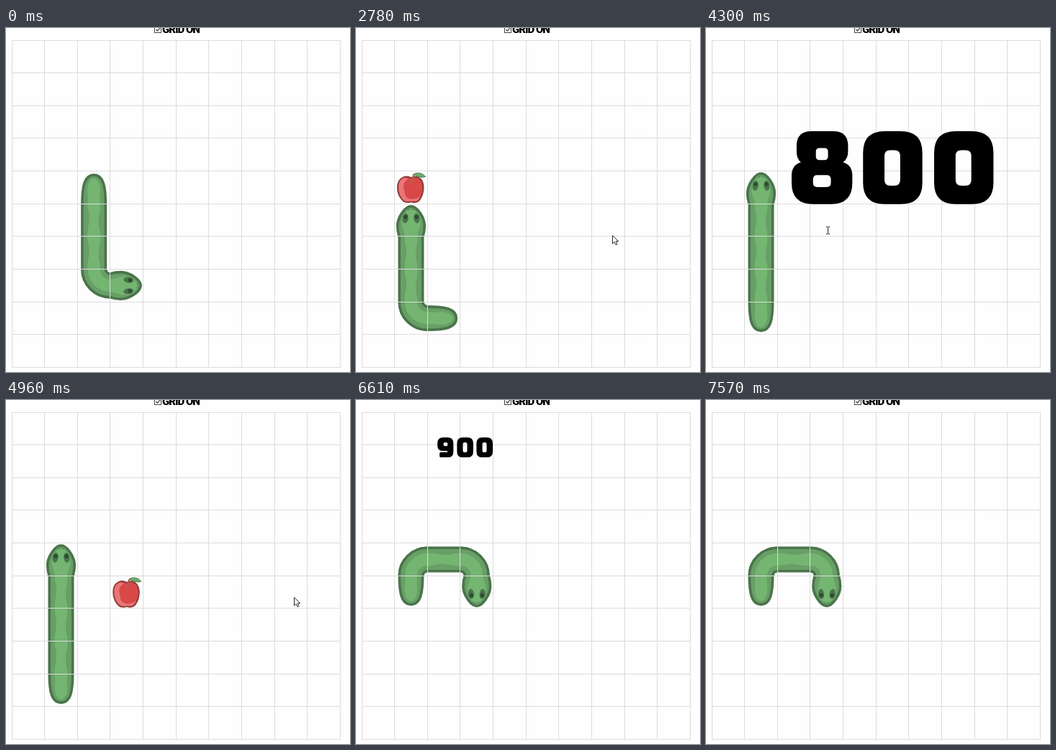
An HTML page that plays this animation: 478x480 px, repeating every 7650 ms.

```html
<!DOCTYPE html>
<html lang="en">
<head>
<meta charset="utf-8">
<title>Snake</title>
<style>
  html, body { margin: 0; width: 100%; height: 100%; overflow: hidden; background: #fefefe; }
  svg { display: block; }
  .dark { fill: #4a744b; }
  .mid { fill: #689f66; }
  .light { fill: #73b571; }
  .edge { fill: #689f66; stroke: #4a744b; stroke-width: 3.6; }
  .arc { fill: none; }
  #label { font: 900 15px Roboto, sans-serif; letter-spacing: -1px; }
</style>
</head>
<body>
<svg width="478" height="480" viewBox="0 0 478 480">
  <defs>
    <!-- Tiles are centred on 0,0 and face up. -->
    <g id="head">
      <path class="edge" d="M-16.5 23C-18.4 17 -18.8 13 -18.8 8C-18.8 -4 -8 -19.4 0 -19.4S18.8 -4 18.8 8C18.8 13 18.4 17 16.5 23"/>
      <path class="light" d="M-9 23C-9 15 -13 11 -13 4C-13 -6 -6 -15 0 -15S13 -6 13 4C13 11 9 15 9 23Z"/>
      <g class="dark">
        <ellipse cx="-7.8" cy="-2.5" rx="4" ry="7" transform="rotate(8 -7.8 -2.5)"/>
        <ellipse cx="7.8" cy="-2.5" rx="4" ry="7" transform="rotate(-8 7.8 -2.5)"/>
        <circle cx="-2.5" cy="-15" r=".9"/><circle cx="2.5" cy="-15" r=".9"/>
      </g>
      <g fill="#2f4b31"><circle cx="-7.6" cy="-4.5" r="2.8"/><circle cx="7.6" cy="-4.5" r="2.8"/></g>
    </g>
    <g id="straight">
      <path class="dark" d="M-18 -23H18V23H-18Z"/>
      <path class="mid" d="M-14.5 -23H14.5V23H-14.5Z"/>
      <path class="light" d="M-9 -23C-9 -13 -5.5 -9 -6.5 0S-9 13 -9 23H9C9 13 5.5 9 6.5 0S9 -13 9 -23Z"/>
    </g>
    <g id="turn" class="arc">
      <path id="bend" d="M0 -22.8A22.8 22.8 0 0 0 22.8 0" stroke="#4a744b" stroke-width="36"/>
      <use href="#bend"/>
      <path d="M0 -22.8A22.8 22.8 0 0 0 22.8 0" stroke="#689f66" stroke-width="29"/>
      <path d="M0 -22.8A22.8 22.8 0 0 0 22.8 0" stroke="#73b571" stroke-width="17"/>
    </g>
    <g id="tail">
      <path class="edge" d="M-16.2 -23C-16.2 2 -13 17.3 0 17.3S16.2 2 16.2 -23"/>
      <path class="light" d="M-9 -23C-7 -14 -9.5 -6 -8.5 0C-7.5 8 -4 12.5 0 12.5S7.5 8 8.5 0C9.5 -6 7 -14 9 -23Z"/>
    </g>
    <g id="eight">
      <path fill-rule="evenodd" d="M36 127.5H66Q87 127.5 87 148V156Q87 166 80 171Q93 175 93 190V200Q93 230 63 230H38Q8 230 8 200V190Q8 175 21 171Q15 166 15 156V148Q15 127.5 36 127.5Z
        M47 151Q42 151 42 156V163Q42 168 47 168H54Q59 168 59 163V156Q59 151 54 151Z
        M44 189Q38 189 38 195V200Q38 206 44 206H57Q63 206 63 200V195Q63 189 57 189Z"/>
    </g>
    <g id="nine">
      <path fill-rule="evenodd" d="M38 127.5H60Q89.5 127.5 89.5 158V200Q89.5 230 62 230H26Q19 230 19 224V209Q19 203 25 203H59V197H36Q8 197 8 168V158Q8 127.5 38 127.5Z
        M45 154Q39 154 39 160V166Q39 172 45 172H54Q60 172 60 166V160Q60 154 54 154Z"/>
    </g>
    <g id="zero">
      <path fill-rule="evenodd" d="M138 127.5H161Q191 127.5 191 158V200Q191 230 161 230H138Q108 230 108 200V158Q108 127.5 138 127.5Z
        M146 154Q138 154 138 162V196Q138 204 146 204H152Q160 204 160 196V162Q160 154 152 154Z"/>
    </g>
  </defs>

  <rect x="206.5" y="-2.5" width="9" height="9" fill="#fff" stroke="#444"/>
  <path d="M208.5 2l2 2.2 4-5" fill="none" stroke="#333" stroke-width="1.2"/>
  <text id="label" x="217" y="7">GRID ON</text>

  <g id="snake"></g>
  <g id="apple">
    <path fill="#d84848" stroke="#8d3a3a" stroke-width="2" d="M0 -13C-6 -17 -18.5 -15 -18.5 0C-18.5 12 -11 20.5 -6 20.5C-3 21 -2 20 0 20S3 21 6 20.5C12 20.5 17 10 17 0C17 -14 6 -17 0 -13Z"/>
    <path fill="#e97676" d="M-8 -13.5C-14 -13 -17.4 -8 -17.4 0C-17.4 11 -10.5 19.5 -6 19.5C-2 20 0 18.5 6 19.3C9 19 12 15 13 12C8 17 0 17 -4 15C-10 13 -8 7 -10 2S-9 -9 -4 -12Z"/>
    <path fill="none" stroke="#a8684a" stroke-width="2.2" d="M1 -6C1 -12 2 -16 5 -19"/>
    <path fill="#6cae6c" stroke="#47734a" stroke-width="1" d="M4 -18C8 -22 16 -20 20 -15C14 -13 8 -15 4 -18Z"/>
  </g>
  <g id="grid" fill="#dcdcdc" shape-rendering="crispEdges"></g>
  <g id="score" role="img">
    <use id="digit"/><use href="#zero"/><use href="#zero" x="99.5"/>
  </g>
  <g id="cursor">
    <path id="arrow" fill="#fff" stroke="#111" stroke-width=".9" d="M.5 .5V12L3.2 9.4L5 13.5L7 12.7L5.2 8.6H8.6Z"/>
    <path id="beam" fill="none" stroke="#222" d="M-1 -3.5H1M2 -3.5H4M1.5 -3V6M-1 6.5H1M2 6.5H4"/>
  </g>
</svg>
<script>
const LOOP = 7650, CELL = 45.65, LEFT = 8, TOP = 17, LENGTH = 5, GROW = 1485;
const $ = id => document.getElementById(id);
const DIRS = { U: [0, -1, 0], R: [1, 0, 90], D: [0, 1, 180], L: [-1, 0, 270] };

const ROUTE = 'DDDRDLLUUUURRD';
const TICKS = [1090, 1320, 1530, 2090, 2320, 2560, 2800, 5460, 5700, 5930];
const APPLES = [[800, 2800, 1, 4], [4960, 5930, 3, 5]];
const SCORES = [[2988, 'eight', '800'], [6080, 'nine', '900']];
const POINTER = [
  [140, 91, 447], [640, 386, 218], [1090, 386, 218], [1530, 393, 291],
  [2600, 393, 291], [3700, 168, 281], [4473, 168, 281], [4900, 400, 275],
  [5190, 400, 275], [5850, 447, 438], [5930, 451, 442], [6100, 452, 482]
];

const cells = [[2, 4]];
for (const d of ROUTE) {
  const [x, y] = cells[cells.length - 1];
  cells.push([x + DIRS[d][0], y + DIRS[d][1]]);
}

const centre = (col, row) => `translate(${LEFT + CELL * (col + .5)} ${TOP + CELL * (row + .5)})`;
const show = (el, on) => el.setAttribute('visibility', on ? 'inherit' : 'hidden');

let lines = '';
for (let i = 0; i <= 10; i++) {
  const x = Math.floor(LEFT + CELL * i), y = Math.floor(TOP + CELL * i);
  lines += `<rect x="${x}" y="${TOP}" width="1" height="457"/><rect x="${LEFT}" y="${y}" width="457" height="1"/>`;
}
$('grid').innerHTML = lines;

// Rotation of a bend that joins its top and right sides at 0 degrees.
function bendAngle(from, to) {
  const a = (DIRS[from][2] + 180) % 360, b = DIRS[to][2];
  return (a + 90) % 360 === b ? a : b;
}

let drawn = -1;
function drawSnake(step) {
  if (step === drawn) return;
  drawn = step;
  let out = '';
  for (let i = 0; i < LENGTH; i++) {
    const n = step + i, before = ROUTE[n - 1], after = ROUTE[n];
    let tile = 'straight', angle;
    if (i === 0) { tile = 'tail'; angle = DIRS[after][2]; }
    else if (i === LENGTH - 1) { tile = 'head'; angle = DIRS[before][2]; }
    else if (before !== after) { tile = 'turn'; angle = bendAngle(before, after); }
    else angle = DIRS[after][2];
    out += `<use href="#${tile}" transform="${centre(...cells[n])} rotate(${angle})"/>`;
  }
  $('snake').innerHTML = out;
}

// cubic-bezier(.42, 0, .58, 1)
function easeInOut(x) {
  let lo = 0, hi = 1, t = .5;
  for (let i = 0; i < 20; i++) {
    t = (lo + hi) / 2;
    const u = 1 - t;
    if (1.26 * u * u * t + 1.74 * u * t * t + t * t * t < x) lo = t; else hi = t;
  }
  return t * t * (3 - 2 * t);
}

function drawScore(t) {
  const hit = SCORES.find(([start]) => t >= start && t < start + GROW);
  show($('score'), hit);
  if (!hit) return;
  const size = 1.02 * easeInOut((t - hit[0]) / GROW);
  $('digit').setAttribute('href', '#' + hit[1]);
  $('score').setAttribute('aria-label', hit[2]);
  $('score').setAttribute('transform', `translate(111 17.5) scale(${size})`);
}

function drawPointer(t) {
  const i = POINTER.findIndex(p => p[0] > t);
  show($('cursor'), i > 0);
  if (i < 1) return;
  const [t0, x0, y0] = POINTER[i - 1], [t1, x1, y1] = POINTER[i];
  const k = (t - t0) / (t1 - t0);
  const x = Math.round(x0 + (x1 - x0) * k), y = Math.round(y0 + (y1 - y0) * k);
  const overText = t >= 4200 && t < SCORES[0][0] + GROW;
  $('cursor').setAttribute('transform', `translate(${x} ${y})`);
  show($('arrow'), !overText);
  show($('beam'), overText);
}

function draw(t) {
  drawSnake(TICKS.filter(tick => tick <= t).length);
  const apple = APPLES.find(([from, to]) => t >= from && t < to);
  show($('apple'), apple);
  if (apple) $('apple').setAttribute('transform', centre(apple[2], apple[3]));
  drawScore(t);
  drawPointer(t);
}

const begin = performance.now();
function frame() {
  draw((performance.now() - begin) % LOOP);
  requestAnimationFrame(frame);
}
frame();
</script>
</body>
</html>
```
